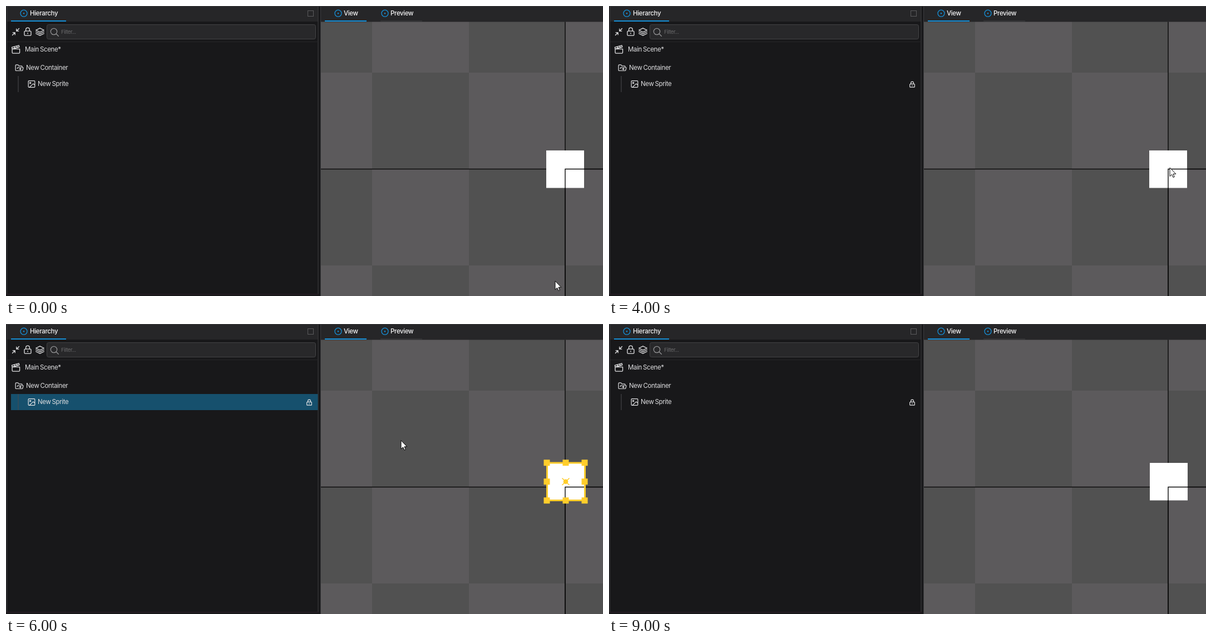
Recreate the animation shown at these times as an HTML page. Size 1073x522 px, loop 9.4 s.

```html
<!DOCTYPE html>
<html lang="en">
<head>
<meta charset="utf-8">
<title>Scene hierarchy: hide and lock</title>
<style>
  html, body { margin: 0; width: 100%; height: 100%; overflow: hidden; background: #18181a; }
  svg { display: block; width: 100vw; height: 100vh; }
  text { font: 400 11.5px Inter, "Open Sans", sans-serif; letter-spacing: -.35px; word-spacing: -1px; fill: #dedee0; }
  .tab { font-weight: 500; fill: #f4f4f5; }
  .hint { font-size: 9.5px; letter-spacing: -.4px; fill: #6a6a6c; }
  .icon { fill: none; stroke: #e4e4e6; stroke-linecap: round; stroke-linejoin: round; }
  .cursor { fill: #fff; stroke: #000; stroke-linejoin: round; }
</style>
</head>
<body>
<svg id="stage" viewBox="0 0 1073 522" preserveAspectRatio="none"></svg>
<script>
const LOOP = 9400, FRAME = 1000 / 15;
const TILE = 173.5, AXIS_X = 1005, AXIS_Y = 293.5;
const BLUE = '#168fd6', YELLOW = '#ffcd2b', HOVER = '#28282a', SELECTED = '#16506d';

const rect = (x, y, w, h, fill, extra = '') =>
  `<rect x="${x}" y="${y}" width="${w}" height="${h}" fill="${fill}" ${extra}/>`;
const label = (x, y, str, cls = '') => `<text x="${x}" y="${y}" class="${cls}">${str}</text>`;

// Icon shapes live in a 24 unit box and are centred on x, y.
const shapes = {
  collapse: 'M3 21l7-7M4 14h6v6M21 3l-7 7M20 10h-6V4',
  lock: 'M5 10h14a2 2 0 0 1 2 2v8a2 2 0 0 1-2 2H5a2 2 0 0 1-2-2v-8a2 2 0 0 1 2-2zM7 10V6a5 5 0 0 1 10 0v4M12 15v2',
  unlock: 'M5 11h14a2 2 0 0 1 2 2v7a2 2 0 0 1-2 2H5a2 2 0 0 1-2-2v-7a2 2 0 0 1 2-2zM7 11V7a5 5 0 0 1 9.6-2',
  layers: 'M12 2L23 7.5 12 13 1 7.5zM1 12l11 5.5L23 12M1 16.5L12 22l11-5.5',
  clapper: 'M3 11h19v9a2 2 0 0 1-2 2H5a2 2 0 0 1-2-2zM3 11L2 7 20 2l1 4zM7 5.5l4 3M13 4l4 3',
  folder: 'M6 14l1.5-3a2 2 0 0 1 2-1H21a2 2 0 0 1 2 2.5l-1.500 6a2 2 0 0 1-2 1.500H3a2 2 0 0 1-2-2V5a2 2 0 0 1 2-2h5l3 3h7a2 2 0 0 1 2 2v2M11 15h6M14.500 12.500l2.500 2.500-2.500 2.500',
  image: 'M4 2h16a2 2 0 0 1 2 2v16a2 2 0 0 1-2 2H4a2 2 0 0 1-2-2V4a2 2 0 0 1 2-2zM6 8.500a2 2 0 1 0 4 0 2 2 0 0 0-4 0M22 15l-5-4L5 22',
  eye: 'M1 12q11-15 22 0-11 15-22 0zM9 12a3 3 0 1 0 6 0 3 3 0 0 0-6 0',
  eyeOff: 'M1 12q11-15 22 0-11 15-22 0zM9 12a3 3 0 1 0 6 0 3 3 0 0 0-6 0M3 2l18 20',
  search: 'M2 10.500a8.500 8.500 0 1 0 17 0 8.500 8.500 0 0 0-17 0M17 17l6 6'
};
const icon = (name, x, y, size, attrs = '', width = 1.3) =>
  `<path class="icon" d="${shapes[name]}" ${attrs} stroke-width="${width * 24 / size}"
    transform="translate(${x - size / 2} ${y - size / 2}) scale(${size / 24})"/>`;

const tabMark = x =>
  `<circle cx="${x}" cy="13.200" r="6" fill="none" stroke="${BLUE}" stroke-width="1.300"/>
   <circle cx="${x}" cy="13.200" r="1.200" fill="${BLUE}"/>`;

function checkers() {
  let out = '';
  for (let r = -2; r < 2; r++)
    for (let c = -3; c < 1; c++)
      out += rect(AXIS_X + c * TILE, AXIS_Y + r * TILE, TILE, TILE,
        (r + c) % 2 ? '#515151' : '#5c5a5c', 'shape-rendering="crispEdges"');
  return out;
}

function gizmo() {
  let out = `<rect x="971.500" y="260" width="68" height="67.500" fill="none" stroke="${YELLOW}" stroke-width="3"/>`;
  for (const dx of [-34, 0, 34])
    for (const dy of [-34, 0, 34])
      if (dx || dy) out += rect(999.500 + dx, 288.200 + dy, 11, 11, YELLOW);
  return out + `<path d="M998.500 287.500l13 12.500M1011.500 287.500l-13 12.500" stroke="${YELLOW}" stroke-width="1.600"/>
    <circle cx="1005" cy="293.700" r="4.300" fill="${YELLOW}"/>`;
}

const panel = `
  ${rect(0, 0, 566, 522, '#18181a')}
  ${rect(2, 0, 559, 28, '#262628')}
  ${rect(0, 0, 1073, 1, '#3c3c3f')}
  ${rect(1, 0, 1, 519, '#3c3c3f')}
  ${rect(560.500, 0, 1, 519, '#3c3c3f')}
  ${rect(2, 64, 559, 1, '#262628')}
  ${rect(0, 518, 562, 1.500, '#281d25')}
  ${rect(9, 26, 99, 2, BLUE)}
  ${tabMark(32)}${label(43, 17, 'Hierarchy', 'tab')}
  ${rect(542.500, 8.500, 10, 10, 'none', 'stroke="#5a5a5c"')}
  ${icon('collapse', 17.500, 46.500, 16)}${icon('lock', 39, 46.500, 16)}${icon('layers', 61, 46.500, 16)}
  ${rect(73.500, 33.500, 483, 26, '#28282a', 'rx="3" stroke="#434345"')}
  ${icon('search', 87, 47, 16, 'style="stroke:#929294"')}${label(99, 50, 'Filter...', 'hint')}
  ${icon('clapper', 17.500, 78, 17)}${label(34, 82, 'Main Scene*')}
  <rect id="row0" x="9" y="97.500" width="551.500" height="28.500"/>
  <rect id="row1" x="9" y="126" width="551.500" height="29"/>
  ${rect(21.500, 126, 1, 29, '#4b4b4e')}
  ${icon('folder', 24, 111.500, 15, '', 1.200)}${label(36, 115, 'New Container')}
  <g id="spriteLabel">${icon('image', 46, 140.500, 14, '', 1.200)}${label(57, 144, 'New Sprite')}</g>
  ${icon('eye', 530, 141, 11, 'id="eye"', 1)}${icon('eyeOff', 530, 141, 11, 'id="eyeOff"', 1)}
  ${icon('unlock', 545, 141, 11.500, 'id="unlocked"', 1)}${icon('lock', 545, 141.300, 11.500, 'id="locked"', 1.200)}
  <g id="row0Tools" opacity=".6">${icon('eye', 530, 112, 11, '', 1)}${icon('unlock', 545, 112, 11.500, '', 1)}</g>`;

const view = `
  <clipPath id="viewBox"><rect x="566" y="28.500" width="507" height="494"/></clipPath>
  ${rect(565, 0, 508, 29, '#262628')}
  ${rect(565, 0, 508, 1, '#3c3c3f')}
  <g clip-path="url(#viewBox)">
    ${checkers()}
    ${rect(566, AXIS_Y - .7, 507, 1.400, '#080808')}${rect(AXIS_X - .7, 28, 1.400, 494, '#080808')}
    <g id="sprite">${rect(971, 260, 68, 67.500, '#fff')}</g>
    <path d="M1073 ${AXIS_Y}H${AXIS_X}V522" fill="none" stroke="#080808" stroke-width="1.400"/>
    <g id="gizmo">${gizmo()}</g>
  </g>
  ${rect(565, 0, 1, 522, '#3c3c3f')}
  ${rect(573, 26, 75, 2, BLUE)}${rect(673, 26.500, 75, 1, '#404043')}
  ${tabMark(597)}${label(607, 17, 'View', 'tab')}
  ${tabMark(681)}${label(691, 17, 'Preview', 'tab')}`;

const arm = 'L-2 -6H-4L0 -10 4 -6H2V-2H6V-4L10 0 6 4V2H2V6H4L0 10 -4 6H-2V2H-6V4L-10 0 -6 -4V-2H-2Z';
const cursors = `
  <path id="arrow" class="cursor" d="M0 0V15.500L3.600 12.200 6 17.500 8.300 16.500 6 11.300H10.800Z"/>
  <path id="hand" class="cursor" stroke-width=".8" d="M-2 1.500a2 2 0 0 1 4 0V6.500q1.500-1 2.500.3 1.700-.8 2.500.5 2-.5 2.200 1.500V13q0 3-2 5V19.500H0V18L-5.500 11.500q-.8-2 1-2.300 1.200 0 2.500 1.800Z"/>
  <path id="move" class="cursor" d="M-2 -2${arm}"/>`;

const stage = document.getElementById('stage');
stage.innerHTML = panel + view + cursors;
const el = {};
stage.querySelectorAll('[id]').forEach(node => el[node.id] = node);

// Pointer path: time, x, y.
const path = [
  [0, 987, 495], [670, 31, 108], [1000, 445, 145], [1400, 528, 142], [2400, 528, 142],
  [2530, 527, 142], [2800, 527, 142], [3000, 549, 142], [3270, 549, 142], [3900, 1008, 291],
  [4200, 1008, 291], [4400, 996, 286], [4600, 1001, 271], [4800, 1011, 279], [4930, 1009, 281],
  [5200, 989, 274], [5270, 989, 274], [5730, 46, 138], [5934, 46, 138], [6000, 710, 209.5],
  [6270, 1010, 285], [6400, 1012, 288], [6530, 985, 270], [6670, 1031, 305], [6870, 1000, 280],
  [7070, 1010, 285], [7200, 1020, 270], [7530, 972, 288], [7730, 1004, 290], [7800, 1004, 290],
  [8160, 150, 37], [8400, 25, 140], [8800, 353, 396], [9000, 170, 530], [LOOP, 170, 530]
];

function pointer(t) {
  const i = Math.max(1, path.findIndex(key => key[0] >= t));
  const [t0, x0, y0] = path[i - 1], [t1, x1, y1] = path[i];
  const u = (t - t0) / (t1 - t0), k = u * u * (3 - 2 * u);
  return [x0 + (x1 - x0) * k, y0 + (y1 - y0) * k];
}

const show = (node, on) => node.setAttribute('visibility', on ? 'visible' : 'hidden');
const place = (node, x, y) => node.setAttribute('transform', `translate(${x} ${y})`);
const between = (t, a, b) => t >= a && t < b;

function draw(ms) {
  const t = Math.floor((ms + 3.4) / FRAME) * FRAME;
  const at = time => t + 4 >= time;
  const [x, y] = pointer(t);

  const hidden = at(1670) && !at(2400);
  const locked = at(3270);
  const picked = at(4130) && !at(5930) ? 0 : at(5930) && !at(7130) ? 1 : -1;
  const inRows = between(x, 9, 561);
  const hover = inRows && between(y, 98, 126) ? 0 : inRows && between(y, 126, 155) ? 1 : -1;

  [el.row0, el.row1].forEach((row, i) =>
    row.setAttribute('fill', picked === i ? SELECTED : hover === i ? HOVER : 'none'));
  show(el.row0Tools, hover === 0);
  el.spriteLabel.setAttribute('opacity', hidden ? .45 : 1);
  show(el.eye, hover === 1 && !hidden);
  show(el.eyeOff, hidden);
  show(el.unlocked, hover === 1 && !locked);
  show(el.locked, locked);
  el.eye.setAttribute('opacity', .6);
  el.unlocked.setAttribute('opacity', .6);

  let dx = 0, dy = 0;
  if (at(4200)) {
    const [px, py] = pointer(Math.min(t, 4930));
    dx = px - 1008;
    dy = py - 291;
  }
  place(el.sprite, dx, dy);
  place(el.gizmo, dx, dy);
  show(el.sprite, !hidden);
  show(el.gizmo, picked >= 0);

  const onGizmo = picked === 0 && between(x, 966, 1045) && between(y, 235, 333);
  const kind = onGizmo ? 'move' : hover >= 0 ? 'hand' : 'arrow';
  for (const name of ['arrow', 'hand', 'move']) {
    show(el[name], name === kind && !at(9000));
    place(el[name], x, y);
  }
}

const start = performance.now();
function tick() {
  draw((performance.now() - start) % LOOP);
  requestAnimationFrame(tick);
}
draw(0);
requestAnimationFrame(tick);
</script>
</body>
</html>
```
